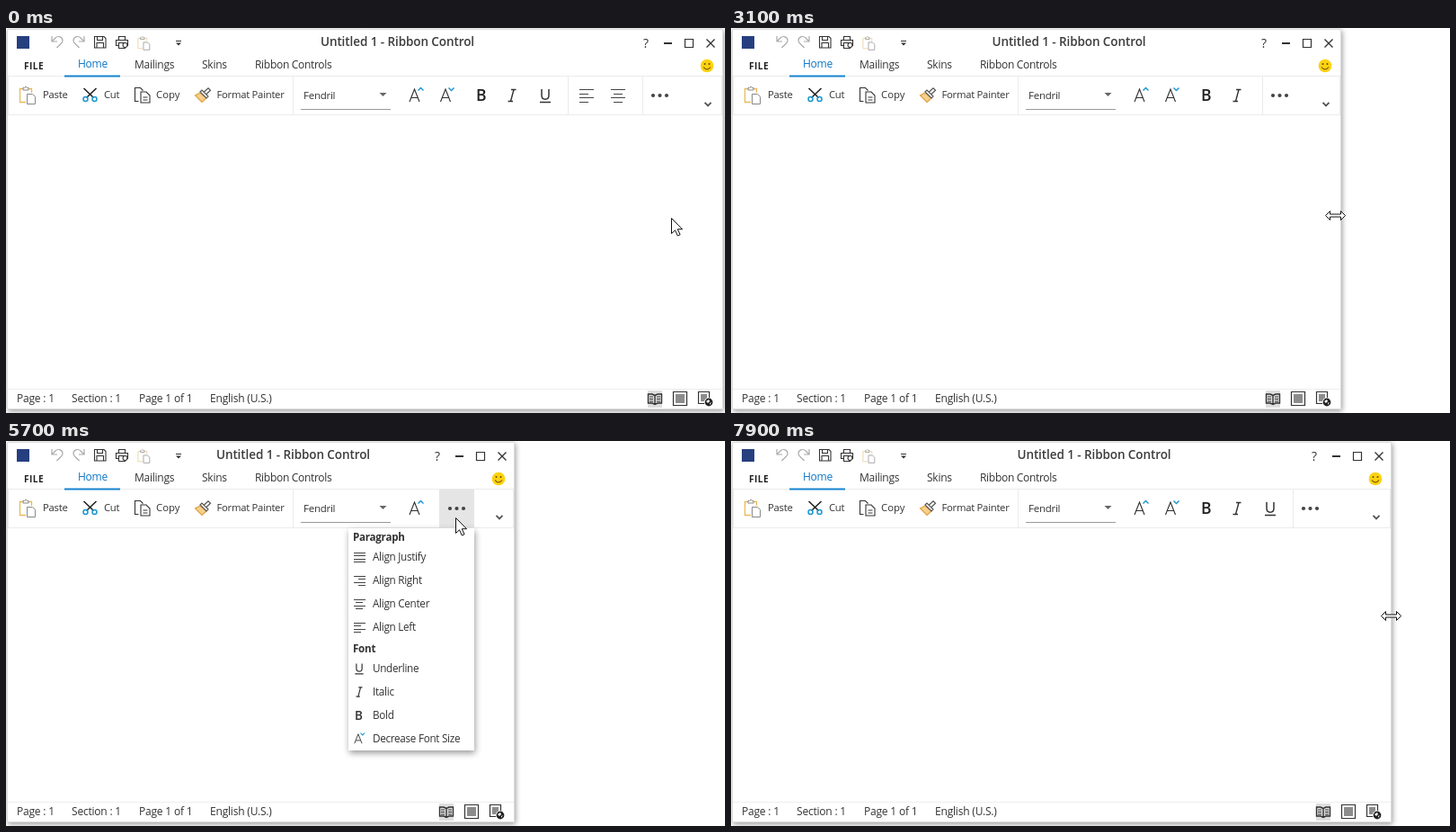
These frames come from a looping animation (800x428 px, 8 s). An HTML page with a canvas:

```html
<!DOCTYPE html>
<html lang="en">
<head>
<meta charset="utf-8">
<title>Ribbon resizing</title>
<style>
  html, body { margin: 0; width: 100%; height: 100%; overflow: hidden; background: #fff; }
  canvas { display: block; }
</style>
</head>
<body>
<canvas id="stage" width="800" height="428"></canvas>
<script>
const ctx = document.getElementById('stage').getContext('2d');
const LOOP = 8000, STEP = 100;
const INK = '#333', BLUE = '#1583cf', ACCENT = '#1b97cf', RULE = '#ebebeb';

// Right edge of the window: [time, x]
const EDGE = [[0, 798], [2300, 798], [2400, 797], [2600, 778], [3100, 679], [3200, 658],
  [3600, 598], [4000, 567], [4100, 566], [7100, 566], [7200, 572], [7300, 588], [7900, 735]];
// Pointer: [time, x from the window edge, y]
const POINTER = [[0, -58, 211], [900, -47, 207], [1700, -13, 204], [1800, -13, 204],
  [1900, -4, 203], [2300, -4, 203], [2400, -8, 203], [3100, -7, 208], [4000, -4, 203],
  [4100, -17, 183], [4300, -49, 117], [4500, -66, 85], [5700, -66, 85], [6000, -40, 125],
  [6400, -10, 178], [6500, -3, 191], [7100, -4, 191], [7900, -1, 194]];

const A = 'M-7 7L-1.5 -7L4 7M-5 2.5H2';
const GLYPH = {
  italic: 'M-1 -6.5H4.5M-4.5 6.5H1M2 -6.5L-1.5 6.5',
  underline: 'M-4 -7V0C-4 5.5 4 5.5 4 0V-7M-6 7.5H6',
  up: 'M2.5 -5.5L5.5 -8.5L8.5 -5.5',
  down: 'M2 -8.5L5 -5.5L8 -8.5',
  arrow: 'M0 0V17L4 13.3L6.8 19.5L9.6 18.2L6.8 12.2H12Z',
  resize: 'M-11 0L-6 -5V-1.5H6V-5L11 0L6 5V1.5H-6V5Z'
};

function track(keys, t, col = 1) {
  const i = keys.findIndex(k => k[0] > t);
  if (i < 0) return keys[keys.length - 1][col];
  const a = keys[i - 1], b = keys[i];
  return a[col] + (b[col] - a[col]) * (t - a[0]) / (b[0] - a[0]);
}

function rect(x, y, w, h, color) {
  ctx.fillStyle = color;
  ctx.fillRect(x, y, w, h);
}

function icon(x, y, d, { stroke = INK, width = 1.2, fill, scale = 1 } = {}) {
  ctx.save();
  ctx.translate(x, y);
  ctx.scale(scale, scale);
  const path = new Path2D(d);
  if (fill) { ctx.fillStyle = fill; ctx.fill(path); }
  if (stroke) { ctx.strokeStyle = stroke; ctx.lineWidth = width / scale; ctx.stroke(path); }
  ctx.restore();
}

function disc(x, y, radius, color) {
  ctx.fillStyle = color;
  ctx.beginPath();
  ctx.arc(x, y, radius, 0, Math.PI * 2);
  ctx.fill();
}

function text(s, x, y, { size = 12, gap = -.25, weight = 400, color = INK, align = 'left' } = {}) {
  ctx.font = `${weight} ${size}px "Open Sans", sans-serif`;
  ctx.letterSpacing = gap + 'px';
  ctx.textAlign = align;
  ctx.fillStyle = color;
  ctx.fillText(s, x, y);
}

// Four lines of text, every second one short
function alignIcon(x, y, mode, width, pitch) {
  for (let i = 0; i < 4; i++) {
    const w = i % 2 && mode !== 'justify' ? Math.round(width * .65) : width;
    const shift = { right: width - w, center: (width - w) / 2 }[mode] || 0;
    rect(Math.round(x - width / 2 + shift), Math.round(y + (i - 1.5) * pitch), w, 1, '#444');
  }
}

function sizeIcon(x, y, dir, scale = 1) {
  const width = scale < 1 ? .9 : 1.15;
  icon(x, y, A, { scale, width });
  icon(x, y, GLYPH[dir], { scale, stroke: ACCENT, width: width * 1.25 });
}

function clipboard(x, y, scale, frame, ink) {
  icon(x, y, 'M7 17.5H.5V2.5H4M10 2.5H13.5V7', { stroke: frame, scale, width: 1.3 * scale });
  icon(x, y, 'M4 4V1.5H5.5L7 0L8.5 1.5H10V4Z', { stroke: ink, scale, width: 1 });
  icon(x, y, 'M8.5 8.5H14.5L17.5 11.5V19.5H8.5Z', { stroke: ink, scale, width: 1, fill: '#fff' });
}

// Collapsible commands: [end x, draw]
const COMMANDS = [
  [482, () => sizeIcon(456, 75, 'up')],
  [516, () => sizeIcon(490.5, 75, 'down')],
  [554, () => text('B', 523, 81, { size: 17.5, weight: 600, gap: 0, color: '#222' })],
  [591, () => icon(563, 75, GLYPH.italic, { width: 1.4 })],
  [625, () => icon(600, 75, GLYPH.underline, { width: 1.5 })],
  [673, () => alignIcon(646, 75, 'left', 16, 4.5)],
  [708, () => alignIcon(681, 75, 'center', 16, 4.5)]
];

const MENU = [
  ['Paragraph', 111],
  ['Align Justify', 133, y => alignIcon(393, y, 'justify', 13, 3.6)],
  ['Align Right', 159, y => alignIcon(393, y, 'right', 13, 3.6)],
  ['Align Center', 185, y => alignIcon(393, y, 'center', 13, 3.6)],
  ['Align Left', 211, y => alignIcon(393, y, 'left', 13, 3.6)],
  ['Font', 235],
  ['Underline', 257, y => icon(393, y, GLYPH.underline, { scale: .78 })],
  ['Italic', 283, y => icon(393, y, GLYPH.italic, { scale: .78 })],
  ['Bold', 309, y => text('B', 388, y + 4.5, { size: 13.5, weight: 600 })],
  ['Decrease Font Size', 335, y => sizeIcon(393, y, 'down', .75)]
];

function panel(x, y, w, h, blur, drop) {
  ctx.save();
  ctx.shadowColor = 'rgba(0,0,0,.4)';
  ctx.shadowBlur = blur;
  ctx.shadowOffsetX = 1;
  ctx.shadowOffsetY = drop;
  rect(x, y, w, h, '#fff');
  ctx.restore();
}

function drawTitleBar(r) {
  rect(12, 9, 14, 14, '#263f7f');
  icon(51, 9, 'M0 0V6H6M0 6L4 2C7 -1 12 1 12 5C12 8 8 10 5.5 13', { stroke: '#aaa' });
  icon(87, 9, 'M0 0V6H-6M0 6L-4 2C-7 -1 -12 1 -12 5C-12 8 -8 10 -5.5 13', { stroke: '#aaa' });
  icon(98.5, 9.5, 'M0 0H10.5L12.5 2V12.5H0ZM3 0V4H9V0M2.5 12.5V7H10V12.5', { width: 1.1 });
  icon(122.5, 9.5, 'M3 4V0H10V4M3 10H0V4H13V10H10M3 7H10V13H3Z', { width: 1.1 });
  icon(132.5, 19, 'M-2.5 0A2.5 2.5 0 1 0 2.5 0A2.5 2.5 0 1 0 -2.5 0', { width: 1.1, fill: '#fff' });
  clipboard(146.5, 9.5, .76, '#efd7a8', '#aaa');
  rect(189, 14, 6, 1, INK);
  icon(192, 16.5, 'M-3 0H3L0 3Z', { stroke: null, fill: INK });
  text('Untitled 1 - Ribbon Control', r / 2 + 36.5, 20,
    { size: 13.5, gap: -.08, weight: 600, color: '#3c3c3c', align: 'center' });
  text('?', r - 86, 22, { size: 14, gap: 0, align: 'center' });
  rect(r - 66, 16, 9, 2, INK);
  icon(r - 42.5, 12.5, 'M0 0H9V9H0Z');
  icon(r - 14, 17, 'M-4.5 -4.5L4.5 4.5M4.5 -4.5L-4.5 4.5', { width: 1.4 });
}

function drawTabs(r) {
  text('FILE', 20, 46, { size: 10.2, gap: .4, weight: 700, color: '#222' });
  text('Home', 80, 44, { color: '#0a74c4' });
  text('Mailings', 143, 45);
  text('Skins', 218, 45);
  text('Ribbon Controls', 277, 45, { gap: -.3 });
  disc(r - 18, 42, 7.3, '#fcd20f');
  disc(r - 20.5, 40, 1, '#6b4a00');
  disc(r - 15.5, 40, 1, '#6b4a00');
  icon(r - 18, 43.5, 'M-4 0Q0 5 4 0', { stroke: '#6b4a00', width: 1.1 });
}

function drawRibbon(r, hot) {
  rect(2, 53, r - 4, 1, RULE);
  rect(2, 96, r - 4, 1, RULE);
  rect(2, 53, 1, 44, RULE);
  rect(r - 2, 53, 1, 44, RULE);
  rect(65, 52.5, 62, 2, BLUE);

  const label = { size: 11.3, gap: -.27 };
  clipboard(15, 65, 1, '#e9b95a', '#888');
  text('Paste', 41, 78, label);
  icon(93.5, 67, 'M-7 0L4 10.5M7 0L-4 10.5', { width: 1.6, stroke: '#222' });
  for (const x of [88.5, 98.5])
    icon(x, 79, 'M-2.5 0A2.5 2.5 0 1 0 2.5 0A2.5 2.5 0 1 0 -2.5 0', { stroke: ACCENT, width: 1.5 });
  text('Cut', 109, 78, label);
  icon(143.5, 66.5, 'M4 15H0V0H6L9 3M6.5 4.5H12.5L16.5 8.5V16.5H6.5ZM9 10.5H14M9 13.5H14', { width: 1.1 });
  text('Copy', 167, 78, { ...label, gap: .05 });
  icon(210, 66, 'M6 6L.5 9L8 16.5L13 12Z', { stroke: '#e0a040', fill: '#f6cf8c' });
  icon(210, 66, 'M6 5L8 3L15 10L13 12ZM10.5 5L15 .8L17.5 3.2L13 7.5', { stroke: '#555', fill: '#fff' });
  text('Format Painter', 234.5, 78, label);

  rect(319, 54, 1, 42, RULE);
  text('Fendril', 331, 79, { size: 11.5 });
  rect(328, 90, 100, 1, '#9a9a9a');
  icon(419.5, 72, 'M-4 0H4L0 4Z', { stroke: null, fill: '#666' });

  const shown = COMMANDS.filter(([end]) => end + 39 <= r - 34);
  const end = shown[shown.length - 1][0];
  shown.forEach(([, draw]) => draw());
  if (end > 625) rect(625, 54, 1, 42, RULE);
  rect(end, 54, 1, 42, RULE);
  if (hot) rect(end, 54, 39, 42, '#e5e5e5');
  for (const dx of [12, 19.5, 27]) disc(end + dx, 75, 2.1, '#444');
  icon(r - 17, 84.5, 'M-3.5 -1.7L0 1.8L3.5 -1.7', { stroke: '#555', width: 1.9 });
}

function drawStatus(r) {
  rect(2, 401, r - 3, 1, '#eee');
  const style = { gap: -.2 };
  text('Page : 1', 12, 416, style);
  text('Section : 1', 73, 416, style);
  text('Page 1 of 1', 148, 416, style);
  text('English (U.S.)', 227, 416, style);
  rect(r - 84, 403, 16, 19, '#dedede');
  icon(r - 76, 412.5, 'M0 -4L-3 -5.5H-7.5V4.5H-3L0 6L3 4.5H7.5V-5.5H3ZV6', { fill: '#ddd', width: 1.4 });
  icon(r - 76, 412.5, 'M-6 -2.5H-2M-6 0H-2M-6 2.5H-2M2 -2.5H6M2 0H6M2 2.5H6');
  icon(r - 55.5, 404.5, 'M0 0H15V15H0Z');
  rect(r - 53, 407, 10, 10, '#8c8c8c');
  icon(r - 27.5, 404.5, 'M0 0H12V13H0Z');
  rect(r - 25, 407, 7, 8, '#8c8c8c');
  disc(r - 16, 416, 5.2, '#fff');
  disc(r - 16, 416, 4.4, '#222');
  icon(r - 16, 416, 'M-3 -1L0 -3L1 -1L-1 1ZM1 1L3 0L1 3Z', { stroke: null, fill: '#fff' });
}

function drawMenu(alpha) {
  ctx.save();
  ctx.globalAlpha = alpha;
  panel(381, 97, 140, 247, 7, 3);
  for (const [label, y, draw] of MENU) {
    if (draw) {
      draw(y - 4);
      text(label, 408, y, { size: 11.7, gap: -.28 });
    } else {
      text(label, 386, y, { size: 11.6, gap: -.25, weight: 700 });
    }
  }
  ctx.restore();
}

function draw(t) {
  const r = Math.round(track(EDGE, t));
  const resizing = t >= 1900 && t <= 4000 || t >= 6500;
  ctx.clearRect(0, 0, 800, 428);
  panel(1, 1, r - 1, 423, 6, 1.5);
  icon(1.5, 1.5, `M0 0H${r - 2}V422H0Z`, { stroke: '#dcdcdc', width: 1 });
  drawTitleBar(r);
  drawTabs(r);
  drawRibbon(r, t >= 4400 && t < 6000);
  drawStatus(r);
  if (t >= 4700 && t < 6000) drawMenu(Math.min(1, (t - 4600) / 200));
  icon(r + Math.round(track(POINTER, t)) + .5, Math.round(track(POINTER, t, 2)) + .5,
    resizing ? GLYPH.resize : GLYPH.arrow, { stroke: '#111', width: 1, fill: '#fff' });
}

function tick(now) {
  draw(Math.floor(now % LOOP / STEP) * STEP);
  requestAnimationFrame(tick);
}
requestAnimationFrame(tick);
</script>
</body>
</html>
```
